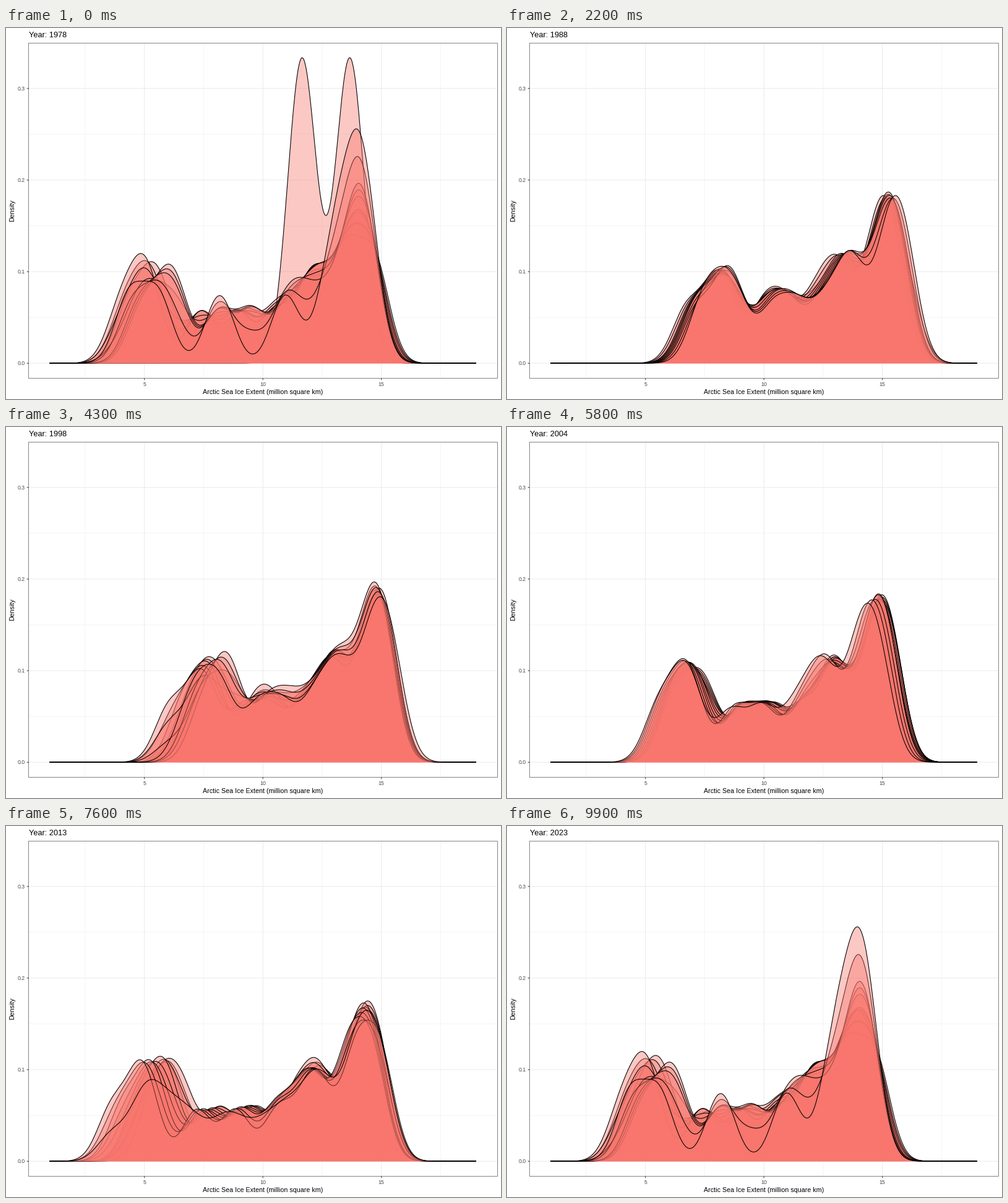
Animation of 800 by 600 pixels, one loop 10000 ms. Source, as a matplotlib script:

```python
import numpy as np
import matplotlib.pyplot as plt
from matplotlib.animation import FuncAnimation
from matplotlib.patches import Polygon, Rectangle

plt.rcParams["font.family"] = "Liberation Sans"

FRAMES, WAKE = 100, 10
FIRST, LAST = 1978, 2023
SPAN = LAST - FIRST
BANDWIDTH = 0.6
PX = 0.72  # points per pixel at 100 dpi

# Turning points of the March maximum and the September minimum
PEAK = {1979: 16.3, 1981: 15.65, 1983: 16.1, 1984: 15.55, 1988: 16.0,
        1991: 15.5, 1996: 15.15, 1998: 15.6, 2003: 15.35, 2006: 14.4,
        2008: 15.0, 2011: 14.6, 2012: 15.05, 2017: 14.3, 2020: 14.73,
        2023: 14.44}
LOW = {1979: 7.1, 1983: 7.4, 1984: 6.8, 1988: 7.35, 1990: 6.15, 1992: 7.4,
       1995: 6.1, 1996: 7.55, 1999: 6.2, 2005: 5.5, 2007: 4.3, 2009: 5.25,
       2012: 3.6, 2013: 5.2, 2018: 4.8, 2020: 4.0, 2021: 4.95, 2023: 4.37}

# Seasonal cycle, January to December: 0 is the minimum, 1 the maximum
CYCLE = {
    1979: [.89, .975, 1, .925, .755, .605, .36, .108, 0, .2, .46, .71],
    2020: [.90, .99, 1, .905, .78, .615, .307, .085, 0, .125, .465, .72],
    2023: [.892, .967, 1, .955, .84, .654, .378, .119, 0, .2, .5, .72],
}
rng = np.random.default_rng(7)


def at(points, year):
    return np.interp(year, list(points), list(points.values()))


def extents(year):
    """Monthly extents; the first and last years are partial."""
    if year == FIRST:
        return np.array([11.65, 13.67])
    cycle = np.array([np.interp(year, list(CYCLE), month)
                      for month in zip(*CYCLE.values())])
    low, peak = at(LOW, year), at(PEAK, year)
    values = low + (peak - low) * cycle
    if year == LAST:
        return values[:9]
    return values + rng.normal(0, 0.07, 12)


def density(values, x):
    z = (x[:, None] - values) / BANDWIDTH
    return np.exp(-z ** 2 / 2).mean(axis=1) / (BANDWIDTH * np.sqrt(2 * np.pi))


def to_x(v):
    return 32.2 + 38.3 * v


def to_y(v):
    return 542.2 - 1481.5 * v


grid = np.linspace(1, 19, 512)
yearly = np.array([density(extents(y), grid) for y in range(FIRST, LAST + 1)])

# Each year sits on a whole frame; curves blend linearly in between
keys = np.round(np.arange(SPAN + 1) * (FRAMES - 1) / SPAN)
curves = []
for pos in np.interp(np.arange(FRAMES), keys, np.arange(SPAN + 1)):
    i = min(int(pos), SPAN - 1)
    curves.append(yearly[i] + (pos - i) * (yearly[i + 1] - yearly[i]))

fig = plt.figure(figsize=(8, 6), dpi=100, facecolor="white")
ax = fig.add_axes([0, 0, 1, 1])
ax.set(xlim=(0, 800), ylim=(600, 0))
ax.axis("off")

LEFT, RIGHT, TOP, BOTTOM = 36.5, 794.3, 24.5, 566.6


def rule(xs, ys, color, width):
    ax.plot(xs, ys, color=color, lw=width * PX, zorder=0, snap=False,
            solid_capstyle="butt")


def label(x, y, s, size, color="black", va="baseline", **kw):
    return ax.text(x, y, s, fontsize=size * PX, color=color, va=va, **kw)


for v in (2.5, 7.5, 12.5, 17.5):
    rule([to_x(v)] * 2, [TOP, BOTTOM], "#ebebeb", 0.53)
for v in (0.05, 0.15, 0.25):
    rule([LEFT, RIGHT], [to_y(v)] * 2, "#ebebeb", 0.53)
for v in (5, 10, 15):
    rule([to_x(v)] * 2, [TOP, BOTTOM], "#ebebeb", 1.07)
    rule([to_x(v)] * 2, [BOTTOM, BOTTOM + 2.7], "#333333", 1.07)
    label(to_x(v), 579, str(v), 8.8, "#4d4d4d", ha="center")
for v in (0, 0.1, 0.2, 0.3):
    rule([LEFT, RIGHT], [to_y(v)] * 2, "#ebebeb", 1.07)
    rule([LEFT - 2.7, LEFT], [to_y(v)] * 2, "#333333", 1.07)
    label(31.2, to_y(v) + 3.1, f"{v:.1f}", 8.8, "#4d4d4d", ha="right")

ax.add_patch(Rectangle((LEFT, TOP), RIGHT - LEFT, BOTTOM - TOP, fill=False,
                       ec="#333333", lw=0.6 * PX, snap=False, zorder=50))
label(414.8, 592, "Arctic Sea Ice Extent (million square km)", 10.65,
      ha="center")
label(9.8, 295.5, "Density", 10.65, rotation=90, ha="center", va="center")
title = label(36.6, 15, "", 12.7)

gx = to_x(grid)
layers = []
for k in range(WAKE + 1):
    fill = Polygon([[0, 0]], closed=True, fc="#f8766d", ec="none", lw=0,
                   alpha=0.4, zorder=2 + 2 * k)
    ax.add_patch(fill)
    line, = ax.plot([], [], color="black", lw=1.07 * PX, zorder=3 + 2 * k,
                    solid_capstyle="butt")
    layers.append((fill, line))


def update(frame):
    shown = sorted((frame - k) % FRAMES for k in range(WAKE + 1))
    for (fill, line), n in zip(layers, shown):
        gy = to_y(curves[n])
        line.set_data(gx, gy)
        base = [(gx[-1], to_y(0)), (gx[0], to_y(0))]
        fill.set_xy(np.vstack([np.column_stack([gx, gy]), base]))
    year = round(FIRST + SPAN * frame / (FRAMES - 1))
    title.set_text(f"Year: {year}")
    return [title]


anim = FuncAnimation(fig, update, frames=FRAMES, interval=100,
                     repeat=True, repeat_delay=0, blit=False)
plt.show()
```
